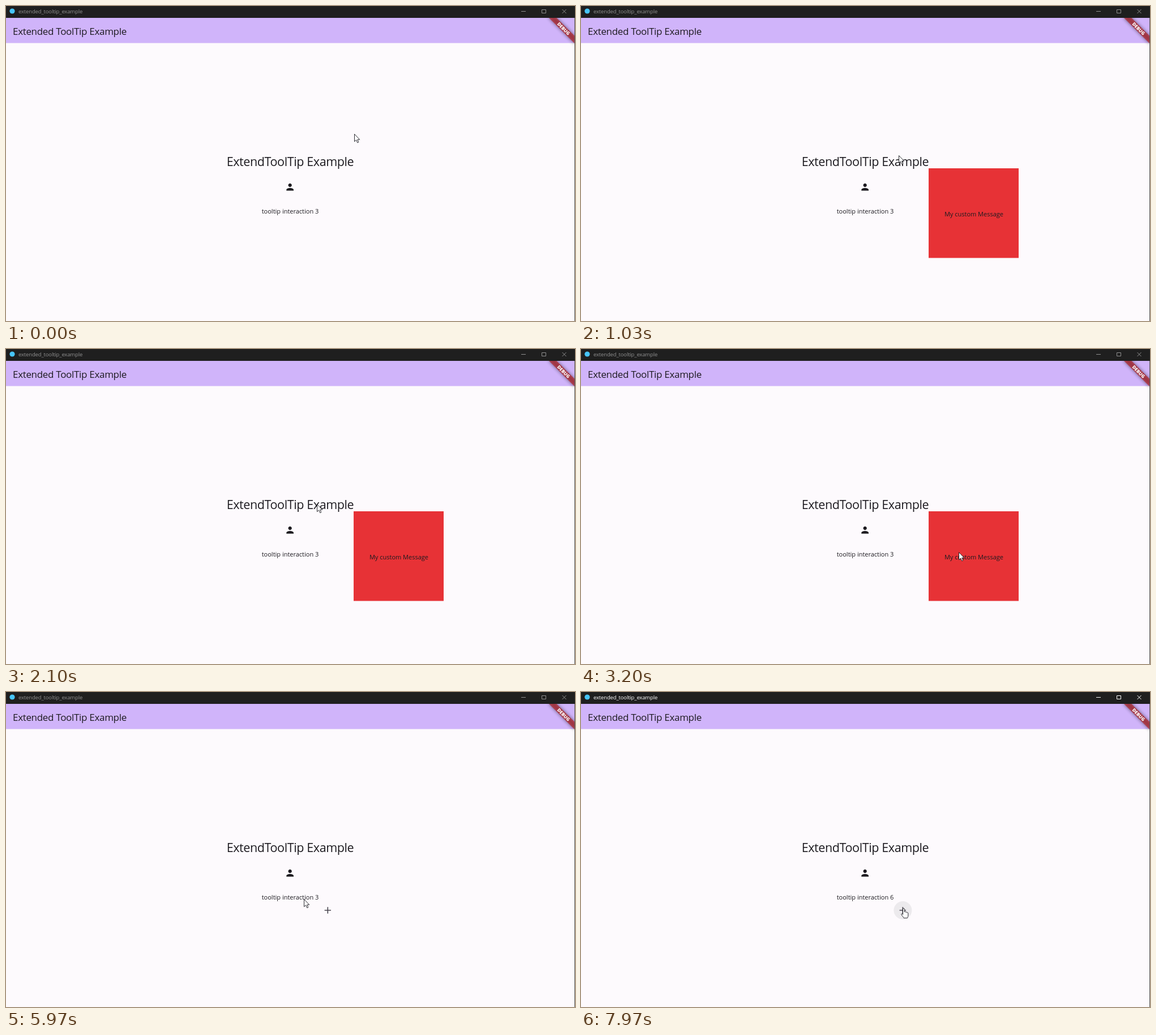
These frames come from a looping animation (1005x557 px, 8000 ms). An HTML page:

```html
<!DOCTYPE html>
<html lang="en">
<head>
<meta charset="utf-8">
<title>Extended ToolTip Example</title>
<style>
  html, body { margin: 0; width: 100%; height: 100%; overflow: hidden; background: #fdfafd; }
  svg { display: block; width: 1005px; height: 557px; font-family: "Open Sans", "Noto Sans", sans-serif; fill: #1d1b20; }
  .middle { text-anchor: middle; }
  .body { font-size: 11px; }
  .cursor { fill: #fff; stroke: #16161c; stroke-width: .9; stroke-linejoin: round; }
</style>
</head>
<body>
<svg viewBox="0 0 1005 557">
  <defs>
    <clipPath id="app"><rect y="21" width="1004" height="536"/></clipPath>
    <filter id="blur" x="-30%" y="-150%" width="160%" height="400%"><feGaussianBlur stdDeviation="3"/></filter>
  </defs>

  <rect width="1005" height="557" fill="#fdfafd"/>
  <rect y="21" width="1005" height="44.5" fill="#d0b4fa"/>
  <rect width="1005" height="21" fill="#1f1f1f"/>
  <circle cx="11" cy="9" r="4.6" fill="#47c5fb"/>
  <g id="chrome">
    <text x="22" y="13" font-size="9.5" letter-spacing="-.15">extended_tooltip_example</text>
    <path d="M910 9.5h8M946.5 6.5h7v6h-7zM982.5 6l7 7m0-7l-7 7" fill="none" stroke="currentColor"/>
  </g>
  <text x="12" y="50.5" font-size="17" letter-spacing="-.32">Extended ToolTip Example</text>

  <g clip-path="url(#app)">
    <g transform="translate(1004 21) rotate(45)">
      <rect x="-32" y="22.3" width="64" height="9.5" opacity=".5" filter="url(#blur)" fill="#000"/>
      <rect x="-32" y="22.3" width="64" height="9.5" fill="#b71c1c" opacity=".64"/>
      <text class="middle" y="30" font-size="8.1" font-weight="800" fill="#fff">DEBUG</text>
    </g>
  </g>
  <path d="M1004.5 21V557" stroke="#555"/>

  <text class="middle" x="502" y="282.5" font-size="21.5" letter-spacing="-.4">ExtendToolTip Example</text>
  <path transform="translate(492.1 310.5) scale(.795)" d="M12 12c2.21 0 4-1.79 4-4s-1.79-4-4-4-4 1.79-4 4 1.79 4 4 4zm0 2c-2.67 0-8 1.34-8 4v2h16v-2c0-2.66-5.33-4-8-4z"/>
  <text class="middle body" id="counter" x="502" y="367">tooltip interaction 3</text>

  <g id="message">
    <rect x="614" y="287" width="159" height="158.5" fill="#e73236"/>
    <text class="middle body" x="694" y="371.5">My custom Message</text>
  </g>
  <g id="button">
    <circle id="hover" cx="568.4" cy="386" r="16" fill="#49454f"/>
    <path d="M562.6 386h11.4M568.3 380.3v11.4" stroke="#49454f" stroke-width="1.6"/>
  </g>

  <g id="pointer" class="cursor">
    <path id="arrow" d="M0 0V13.2L3.1 10.4 5.2 15.2 7.3 14.3 5.3 9.7H9.2Z"/>
    <path id="hand" d="M-1 11V1.4a1.4 1.4 0 0 1 2.8 0V6.4c.8-.8 2.4-.6 2.5.5.8-.5 2-.3 2.1.7.9-.4 1.9 0 1.9 1.2V12.5c0 2.6-1.1 3.2-1.3 4.7H.6c-.5-1.8-3.5-4.4-4.2-6.2-.5-1.3.9-2 1.7-1.1Z"/>
  </g>
</svg>
<script>
const LOOP = 8000, FADE = 150, BUTTON_AT = 5970, BUTTON_LEFT = 553;
const [chrome, counter, message, button, hover, pointer, arrow, hand] =
  ['chrome', 'counter', 'message', 'button', 'hover', 'pointer', 'arrow', 'hand']
    .map(id => document.getElementById(id));

const origin = { x: 615, y: 226 };
const moves = [
  { from: 30, to: 830, x: 561, y: 264 },     // onto the heading
  { from: 1330, to: 1600, x: 553, y: 296 },  // briefly off it
  { from: 1600, to: 2100, x: 549, y: 274 },  // and back
  { from: 2470, to: 3270, x: 668, y: 360 },  // into the message
  { from: 3300, to: 3600, x: 501, y: 318 },  // to the icon
  { from: 4670, to: 5330, x: 526, y: 366 },  // to the counter
  { from: BUTTON_AT, to: 6770, x: 569, y: 382 }
];

const clamp = (v, max = 1) => Math.min(max, Math.max(0, v));
const ramp = (time, from, length = FADE) => clamp((time - from) / length);
const easeOut = k => 1 - (1 - k) ** 2;

function pointerAt(time) {
  return moves.reduce((p, m) => {
    const k = easeOut(ramp(time, m.from, m.to - m.from));
    return { x: p.x + (m.x - p.x) * k, y: p.y + (m.y - p.y) * k };
  }, origin);
}

function draw(time) {
  const { x, y } = pointerAt(time);
  const overButton = time > BUTTON_AT && x > BUTTON_LEFT;
  pointer.setAttribute('transform', `translate(${Math.round(x) + .5} ${Math.round(y) + .5})`);
  arrow.style.opacity = +!overButton;
  hand.style.opacity = +overButton;

  message.style.opacity = ramp(time, 870) - ramp(time, 1600) + ramp(time, 1790) - ramp(time, 3420);
  button.style.opacity = +(time >= BUTTON_AT);
  hover.style.opacity = .09 * ramp(time, 6280);

  const clicks = clamp(Math.floor((time - 7230) / 250) + 1, 3);
  counter.textContent = `tooltip interaction ${3 + clicks}`;
  chrome.style.color = chrome.style.fill = clicks ? '#fff' : '#909090';
}

const start = performance.now();
function tick() {
  draw((performance.now() - start) % LOOP);
  requestAnimationFrame(tick);
}
tick();
</script>
</body>
</html>
```
